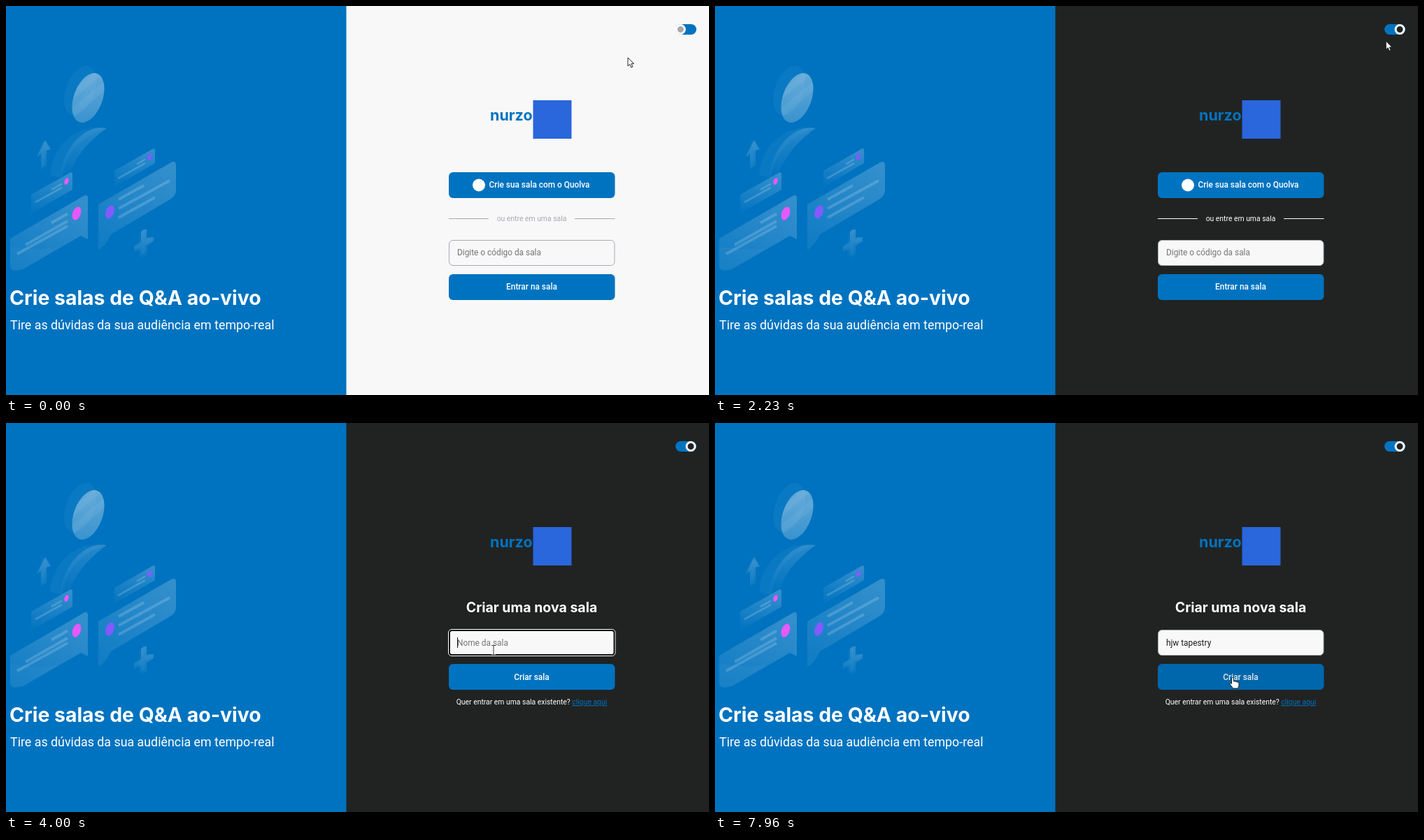
Write an HTML page that moves like this. It is 1005 by 557 pixels and loops after 8 s.

```html
<!DOCTYPE html>
<html lang="pt-BR">
<head>
<meta charset="utf-8">
<title>Salas ao vivo</title>
<style>
  html, body { margin: 0; width: 100%; height: 100%; overflow: hidden; background: #f8f8f8; }
  svg { display: block; }
  text { font: 11.87px Roboto, sans-serif; white-space: pre; }
  .bold { font-family: Inter, sans-serif; font-weight: 700; }
  .label { font-weight: 500; fill: #fff; }
  .small { font-size: 10.39px; }
  .mid { text-anchor: middle; }
  .hint { fill: #757575; }
  .btn { fill: #0073c0; }
  .bar { stroke: #fff; stroke-opacity: .17; stroke-width: 4; fill: none; }
  .thin { stroke-width: 2.6; }
  .ring rect { fill: none; }
</style>
</head>
<body>
<svg width="1005" height="557" viewBox="0 0 1005 557">
  <defs>
    <linearGradient id="fade" x1=".6" y1="0" x2=".4" y2="1">
      <stop stop-color="#fff" stop-opacity=".2"/>
      <stop offset="1" stop-color="#fff" stop-opacity=".02"/>
    </linearGradient>
    <linearGradient id="card" x1=".8" y1="0" x2=".2" y2="1">
      <stop stop-color="#fff" stop-opacity=".2"/>
      <stop offset="1" stop-color="#fff" stop-opacity=".07"/>
    </linearGradient>
    <linearGradient id="face" x1=".5" y1="0" x2=".4" y2="1">
      <stop stop-color="#fff" stop-opacity=".38"/>
      <stop offset="1" stop-color="#fff" stop-opacity=".22"/>
    </linearGradient>
    <clipPath id="head"><ellipse cx="117.5" cy="131.5" rx="20.5" ry="37" transform="rotate(20 117.5 131.5)"/></clipPath>
    <g id="logo">
      <text class="bold" x="692" y="164" fill="#0073c0" style="font-size:21.5px">nurzo</text>
      <rect x="753.5" y="135" width="55" height="55" fill="#2a66dc"/>
    </g>
    <g id="field">
      <rect x=".5" y=".5" width="236.5" height="36" rx="5.5" fill="#f8f8f8" stroke="#a8a8b3"/>
    </g>
    <g id="focus" class="ring">
      <rect x="-.5" y="-.5" width="238.5" height="38" rx="4.5" stroke="#fff"/>
      <rect x="1" y="1" width="235.5" height="35" rx="3.5" stroke="#101010" stroke-width="2"/>
    </g>
  </defs>

  <rect width="487" height="557" fill="#0073c0"/>
  <g id="art">
    <ellipse cx="106" cy="121" rx="20.5" ry="37" transform="rotate(20 106 121)" fill="#fff" opacity=".04"/>
    <g clip-path="url(#head)">
      <rect x="90" y="92" width="55" height="80" fill="url(#face)"/>
      <path d="M90 150L145 104V118L90 164ZM90 126L145 80V92L90 138Z" fill="#fff" opacity=".05"/>
    </g>
    <path d="M143 175C104 168 67 195 63 242L80 246C84 214 106 186 143 175Z" fill="#fff" opacity=".04"/>
    <path d="M144 175C112 168 81 205 78 244L92 238C100 216 116 195 144 175Z" fill="url(#fade)" opacity=".75"/>
    <path d="M56 192L64 205L58 207V229L50 235V212L44 216Z" fill="url(#fade)"/>
    <path d="M53 192L61 205L55 207V229L50 232V212L44 216Z" fill="#fff" opacity=".04"/>

    <path d="M36 270L91 239Q95 237 95 241V263L36 297Z" fill="url(#fade)"/>
    <path class="bar thin" d="M65 263L80 254.500M42 281L80 260"/>
    <path d="M155 236L209 205Q213 202 213 207V225L155 259Z" fill="url(#fade)"/>
    <path class="bar thin" d="M187 226.500L199 219.500M160 247L199 225"/>

    <path d="M6 333L111 272Q117 269 117 275V334L107 329L26 376Q6 383 6 372Z" fill="url(#card)"/>
    <path d="M6 345L50 349L75 346L26 376Q6 383 6 372Z" fill="#fff" opacity=".03"/>
    <path class="bar" d="M65 310.500L88 297.500M28 342L88 308M16 355L88 315"/>
    <path d="M132 284L236 224Q243 221 243 228V265Q242 272 236 276L150 327Q142 344 132 349Z" fill="url(#card)"/>
    <path class="bar" d="M161 277L197 257M161 290L234 250M161 303L213 274"/>
    <path d="M193 323Q197 319 201 320V332L211 331V337L201 343V356L193 361V348L183 352V344L193 338Z" fill="url(#fade)"/>
    <path d="M190 325L198 321V334L208 330V336L198 342V354L190 358V346L183 350V344L190 340Z" fill="#fff" opacity=".03"/>
    <g fill="#e559f9">
      <ellipse cx="101" cy="297" rx="5.800" ry="10" transform="rotate(20 101 297)"/>
      <ellipse cx="86.500" cy="251" rx="3" ry="5" transform="rotate(20 86.500 251)"/>
    </g>
    <g fill="#835afd">
      <ellipse cx="148.500" cy="295" rx="5.800" ry="10" transform="rotate(20 148.500 295)"/>
      <ellipse cx="205" cy="216" rx="3" ry="5" transform="rotate(20 205 216)"/>
    </g>
  </g>
  <text class="bold" x="5" y="427.500" fill="#fff" style="font-size:28.4px">Crie salas de Q&amp;A ao-vivo</text>
  <text x="6" y="463" fill="#fff" style="font-size:17.83px">Tire as dúvidas da sua audiência em tempo-real</text>

  <rect id="pane" x="486.500" width="519" height="557"/>
  <rect class="btn" x="957" y="26" width="30" height="15" rx="7.500"/>
  <circle id="knob" cy="33.500" r="6" stroke="#fff" stroke-width="3"/>

  <g id="home">
    <use href="#logo"/>
    <rect class="btn" x="633" y="238" width="237.500" height="37" rx="6"/>
    <circle cx="676" cy="256.500" r="9" fill="#fff"/>
    <text class="label" x="690.500" y="260.300">Crie sua sala com o Quolva</text>
    <rect id="homeShade" x="633" y="238" width="237.500" height="37" rx="6"/>
    <g id="divider">
      <path d="M633 304h57v1h-57zM813 304h57.500v1h-57.500z"/>
      <text class="small mid" x="751.500" y="308.200">ou entre em uma sala</text>
    </g>
    <use href="#field" x="633" y="335"/>
    <use id="homeFocus" href="#focus" x="633" y="335"/>
    <text class="hint" x="645" y="357.300">Digite o código da sala</text>
    <rect class="btn" x="633" y="384" width="237.500" height="37" rx="6"/>
    <text class="label mid" x="751.500" y="406.300">Entrar na sala</text>
  </g>

  <g id="create">
    <use href="#logo" y="14"/>
    <text class="bold mid" x="751.500" y="271" fill="#fff" style="font-size:19.5px">Criar uma nova sala</text>
    <use href="#field" x="633" y="296"/>
    <use id="createFocus" href="#focus" x="633" y="296"/>
    <text id="hint" class="hint" x="645" y="318.500">Nome da sala</text>
    <text id="typed" x="645" y="318.500" fill="#1c1c1c"></text>
    <path id="squiggle" fill="none" stroke="#e33" stroke-width=".9"/>
    <rect class="btn" x="633" y="345" width="237.500" height="37" rx="6"/>
    <text class="label mid" x="751.500" y="367.600">Criar sala</text>
    <rect id="createShade" x="633" y="345" width="237.500" height="37" rx="6"/>
    <text class="small mid" x="751.500" y="403.200" fill="#fff">Quer entrar em uma sala existente? <tspan fill="#0073c0" text-decoration="underline">clique aqui</tspan></text>
  </g>

  <rect id="caret" width="1" fill="#111"/>
  <g id="status">
    <path d="M0 543H299Q302 543 302 546V557H0Z" fill="#2b4256"/>
    <text class="small" x="0" y="553" fill="#cdd5dc">..</text>
  </g>
  <circle id="press" r="9.300" fill="#ffeb1e" opacity=".6"/>
  <path id="arrow" d="M0 0V12L2.800 9.400L4.800 14L6.900 13.100L5 8.700H8.700Z" fill="#fff" stroke="#111" stroke-width=".9"/>
  <path id="hand" d="M-1.500 .5Q0 -1.700 1.500 .5V5Q3 4 4.300 5.400Q6 4.800 6.800 6.200Q8.800 5.800 9 7.500V11Q8.500 13 7.500 15H.5Q-1.500 12 -4 8.800Q-4 7 -2.500 7.600L-1.500 8.600Z" fill="#fff" stroke="#111" stroke-width=".9"/>
  <path id="beam" d="M-3 -6.500H-.7L0 -6L.7 -6.500H3M0 -6V6M-3 6.500H-.7L0 6L.7 6.500H3" fill="none" stroke="#bbb" style="mix-blend-mode:difference"/>
</svg>
<script>
const $ = id => document.getElementById(id);
const show = (id, on) => $(id).style.display = on ? '' : 'none';
const set = (id, attrs) => { for (const k in attrs) $(id).setAttribute(k, attrs[k]); };
const clamp = x => Math.max(0, Math.min(1, x));
const within = (t, a, b) => t >= a && t < b;
const inside = (p, [x, y, w, h]) => p[0] >= x && p[0] <= x + w && p[1] >= y && p[1] <= y + h;

// Progress in n hard steps, the first at a and the last at b
const steps = (t, a, b, n) => t < a ? 0 : clamp((Math.floor((t - a) / (b - a) * (n - 1) + .01) + 1) / n);
const smooth = p => p * p * (3 - 2 * p);

const LOOP = 8000, DARK = 1220, PAGE = 3330, BLINK = 530;
const TEXT = 'hjw tapestry';
const KEYS = [4720, 4920, 5180, 5310, 5510, 5660, 5730, 5930, 6130, 6330, 6400, 6660];
const CLICKS = [[1090, 1220], [3060, 3200], [3940, 4000], [7670, 7870]];

// Pointer legs: start, end, steps, destination
const START = [889, 74];
const LEGS = [
  [70, 410, 6, [978, 28]],
  [760, 830, 2, [975, 33]],
  [2160, 2600, 7, [689, 345]],
  [2690, 2850, 3, [718, 243]],
  [3260, 3400, 3, [718, 260]],
  [3530, 3740, 4, [697, 325]],
  [6860, 7150, 5, [740, 365]]
];
const TOGGLE = [957, 26, 30, 15];
const HOME = {
  hand: [TOGGLE, [633, 238, 238, 37], [633, 384, 238, 37]],
  beam: [[633, 335, 238, 37], [702, 298, 99, 13]]
};
const CREATE = {
  hand: [TOGGLE, [633, 345, 238, 37]],
  beam: [[658, 252, 187, 26], [633, 296, 238, 37]]
};

$('squiggle').setAttribute('d', 'M645 321.3' + 'l1.5 -1.8 1.5 1.8'.repeat(6));

function pointer(t) {
  let p = START;
  for (const [a, b, n, to] of LEGS) {
    const k = smooth(steps(t, a, b, n));
    p = p.map((v, i) => v + (to[i] - v) * k);
  }
  return p;
}

function draw(t) {
  const dark = t >= DARK, home = t < PAGE;
  $('pane').style.fill = dark ? '#212322' : '#f8f8f8';
  $('divider').style.fill = dark ? '#fff' : '#a8a8b3';
  show('home', home);
  show('create', !home);
  show('status', within(t, 3400, 3600));

  const slide = smooth(steps(t, DARK, 1430, 4));
  const gray = Math.round(168 - 134 * slide ** 2);
  set('knob', { cx: 964.3 + 14.7 * slide, fill: `rgb(${gray},${gray},${gray})` });

  set('homeShade', { opacity: .1 * clamp((t - 2850) / 200) });
  set('createShade', { opacity: .1 * clamp((t - 7050) / 200) });

  // Fields, typing and caret
  const count = KEYS.filter(k => t >= k).length;
  const homeFocus = within(t, 70, DARK), createFocus = within(t, 3940, 7740);
  show('homeFocus', homeFocus);
  show('createFocus', createFocus);
  show('hint', !count);
  $('typed').textContent = TEXT.slice(0, count);
  show('squiggle', createFocus && count > 3);
  const since = home ? 30 : count ? KEYS[count - 1] : 3930;
  show('caret', (homeFocus || createFocus) && (t - since) % (2 * BLINK) < BLINK);
  const width = count ? $('typed').getComputedTextLength() : 0;
  set('caret', { x: Math.round(645 + width), y: home ? 346 : 307, height: home ? 14 : 15 });

  // Pointer
  const p = pointer(t), zones = home ? HOME : CREATE;
  const shape = ['hand', 'beam'].find(s => zones[s].some(z => inside(p, z))) || 'arrow';
  const transform = `translate(${p[0].toFixed(1)} ${p[1].toFixed(1)})`;
  for (const id of ['arrow', 'hand', 'beam']) {
    show(id, id === shape);
    set(id, { transform });
  }
  set('press', { transform });
  show('press', CLICKS.some(([a, b]) => within(t, a, b)));
}

function tick() {
  draw(performance.now() % LOOP);
  requestAnimationFrame(tick);
}
tick();
</script>
</body>
</html>
```
